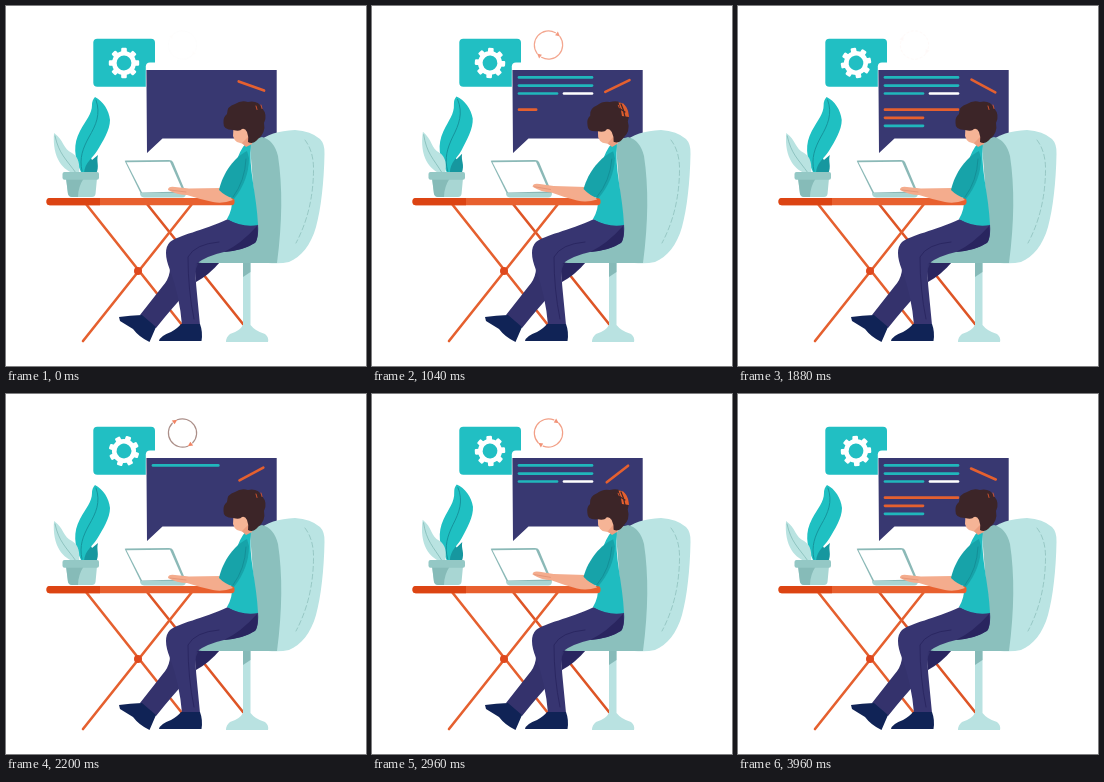
These frames come from a looping animation (360 by 360 pixels, 4000 ms). An HTML page:

```html
<!DOCTYPE html>
<html lang="en">
<head>
<meta charset="utf-8">
<title>Working at a desk</title>
<style>
html, body { margin: 0; width: 100%; height: 100%; overflow: hidden; background: #fff; }
svg { display: block; width: 100vw; height: 100vh; }
.line { fill: none; stroke-linecap: round; stroke-linejoin: round; }
</style>
</head>
<body>
<svg viewBox="0 0 360 360">
  <rect x="87.3" y="32.800" width="61.7" height="48" rx="4" fill="#21bfc3"/>
  <g id="gear" fill="#fff"></g>
  <path d="M139.800 82V60.500Q140 56.500 144 56.500H150V82Z" fill="#fff"/>

  <path d="M140.400 64H270.700V132.600H156.500L141 147Z" fill="#383871"/>
  <g id="code" class="line" stroke-width="2.700"></g>
  <path id="slash" class="line" d="M-13.500 0H13.500" stroke="#e5602f" stroke-width="2.600"/>

  <g id="sync" class="line" stroke-width="1.2">
    <path d="M-3.500-13.700A14.200 14.200 0 0 0-2.500 14M3.500 13.700A14.200 14.200 0 0 0 2.500-14"/>
    <path d="M-2.500-16.200L2.500-14L-2-11.600ZM2.500 16.200L-2.500 14L2 11.600Z" fill="#ee704b" stroke="none"/>
  </g>

  <!-- table legs -->
  <g class="line" stroke="#e5602f" stroke-width="2.600">
    <path d="M141 198L237 318" stroke="#de5526"/>
    <path d="M80 198L176 319M186 198L77 335"/>
  </g>
  <circle cx="132" cy="265" r="4" fill="#df481d"/>

  <!-- plant -->
  <path id="leafLow" d="M75 168C76 160 80 155 84 150L86 154L92 149C90 156 94 160 90 168Z" fill="#16979f"/>
  <g id="leafBig">
    <path d="M75 166C68 151 67 138 74 125C80 114 86 108 86 99Q86 94 89 91C97 95 103 104 104 114C104 124 97 135 91 145C86 153 79 156 78 167Z" fill="#1fc0c2"/>
    <path d="M76 165C73 152 77 142 83 131C90 119 95 108 90 94" class="line" stroke="#168f98" stroke-width=".9"/>
  </g>
  <g id="leafPale">
    <path d="M70 168C57 165 46 152 48 127C58 134 57 143 66 147C73 151 74 159 73 168Z" fill="#b9e3e1"/>
    <path d="M49 130C53 148 60 153 70 167" class="line" stroke="#83bbb8" stroke-width=".8"/>
  </g>
  <path d="M60 172H91L89.500 188Q89 191 86 191H66Q63 191 62 188Z" fill="#a8d6d3"/>
  <path d="M60 172H78Q72 181 72 191H66Q63 191 62 188Z" fill="#86bbb8"/>
  <rect x="56.500" y="166" width="36.500" height="7.800" rx="2" fill="#94c8c5"/>

  <!-- chair -->
  <path d="M237 255H244.500V319Q249 325 259 328Q263 331 262 336H220Q220 331 224 328Q234 325 237 319Z" fill="#b9e2e1"/>
  <path d="M237 256H244.500V266L237 271Z" fill="#86bab8"/>
  <path d="M188 256H214Q203 269 190 276Z" fill="#292660"/>
  <path d="M252 136Q264 125 289 124Q305 125 314 133Q319 138 318.500 148C318 176 315 203 310 221C305 239 295 251 283 256Q275 258 262 257Z" fill="#bae4e3"/>
  <path d="M299 134Q308 146 307.500 165Q307 205 290 237" class="line" stroke="#8fc0bd" stroke-width=".8" stroke-dasharray="5 3"/>
  <path d="M244 140Q247 133 256 131Q268 134 272 150Q279 196 271 257H196Q190 257 192 253L232 241Q249 235 250 215Z" fill="#8bc0bd"/>

  <!-- legs -->
  <path d="M161 247Q169 267 156 281L134 309L150 322Q166 302 180 287L192 258Z" fill="#34326c"/>
  <path d="M222 213Q237 221 252 218Q253 229 250 236Q240 244 218 246Q200 250 190 258Q189 270 191 288L194 319H176Q174 292 164 264Q156 244 164 236C173 229 196 225 222 213Z" fill="#373571"/>
  <path d="M251 220Q253 231 249 237Q235 245 218 246Q235 238 251 220Z" fill="#29255f"/>
  <path d="M213 236Q189 238 182 251Q182 284 188 313" class="line" stroke="#28245e" stroke-width=".8"/>
  <path d="M113 311Q124 309.500 136 309L150 321L143.500 336Q133 331 127 323L114 315Z" fill="#102356"/>
  <path d="M153 335Q154 330 165 326Q172 322 175 318H194Q197 326 195.500 335Z" fill="#102356"/>

  <!-- torso and head -->
  <path d="M237 141Q241 136 245 137C242 162 251 190 252 219Q237 222 221 213Q227 203 226 191Q226 158 237 141Z" fill="#1fbcc0"/>
  <g id="head">
    <path d="M227.500 121H242L245 135L240 140Q236 137 231 136Q228 134 227 130Z" fill="#f5b496"/>
    <path d="M236 137L245 128L246 138L240 141Z" fill="#ec9e80"/>
    <path d="M221 108Q221 100 229 98Q235 94 242 96Q252 94 256 102Q262 109 258 117Q260 127 252 133Q247 139 242 136Q243 131 241 126Q239 122 236 123Q234 126 227 124Q217 124 217.500 117Q217 111 221 108Z" fill="#3c2528"/>
    <path d="M250 100L251 103.500M255 99L256 102.500" class="line" stroke="#d9552f" stroke-width=".9"/>
  </g>
  <g id="shine">
    <path d="M246.500 96.500Q256 97 257 111L250 110Q249 102 246.500 96.500Z" fill="#e5602f"/>
    <path d="M242 101Q248 102 253 106M249 98Q252 104 253 111" class="line" stroke="#3c2528" stroke-width="1.200"/>
  </g>

  <!-- table and laptop -->
  <rect x="40.500" y="192" width="188" height="7.200" rx="3" fill="#e8602f"/>
  <path d="M94 192H44Q40.500 192 40.500 195.600T44 199.200H94Z" fill="#dc4413"/>
  <path d="M119 155.500Q118 154.500 120 154.500L163 154Q166 154 167 156L180 187L135 188Z" fill="#8bb9b7"/>
  <path d="M120.500 156.200L164 155.700L177 185.500L136 186.500Z" fill="#fff"/>
  <path d="M134 187H180Q180 191.500 176 191.500H138Q134 191 134 187Z" fill="#a9d4d1"/>

  <!-- arm -->
  <g id="arm">
    <path d="M162 184Q162 180 169 181L183 182.500L215 182L227 194Q217 198 207 196Q193 193 181 189Q171 189 162 184Z" fill="#f4ac8d"/>
    <path d="M164 184L180 186" class="line" stroke="#df8e71" stroke-width=".7"/>
    <path d="M241 145C229 151 217 166 213 184Q219 190 228 193Q243 174 243 152Z" fill="#17a3a9"/>
    <path d="M240 153Q239 175 227 191" class="line" stroke="#138b94" stroke-width=".8"/>
  </g>
</svg>
<script>
const $ = id => document.getElementById(id);
const NS = 'http://www.w3.org/2000/svg';
const PERIOD = 2000;
const clamp = x => Math.max(0, Math.min(1, x));
const ease = x => { x = clamp(x); return x * x * (3 - 2 * x); };
const ramp = (t, a, b) => ease((t - a) / (b - a));

function add(parent, name, attrs) {
  const el = document.createElementNS(NS, name);
  for (const key in attrs) el.setAttribute(key, attrs[key]);
  return parent.appendChild(el);
}

function track(keys, t) {
  const i = Math.max(1, keys.findIndex(k => k[0] >= t));
  const [a, from] = keys[i - 1], [b, to] = keys[i];
  return from + (to - from) * clamp((t - a) / (b - a));
}

function turn(id, angle, x, y) {
  $(id).setAttribute('transform', `rotate(${angle} ${x} ${y})`);
}

// Gear: a ring with eight teeth
add($('gear'), 'circle', { cx: 118, cy: 57, r: 9.7, fill: 'none', stroke: '#fff', 'stroke-width': 4.6 });
for (let i = 0; i < 8; i++) {
  add($('gear'), 'rect', {
    x: 115.2, y: 41.8, width: 5.6, height: 6, rx: 1.2,
    transform: `rotate(${i * 45} 118 57)`
  });
}

// x, y, length, colour, start, end
const lines = [
  [147, 71.4, 73, '#20b7bc', 40, 220],
  [147, 79.6, 73, '#20b7bc', 270, 540],
  [147, 87.5, 38, '#20b7bc', 610, 760],
  [192, 87.5, 28, '#fff', 780, 930],
  [147, 103.7, 73, '#e5602f', 980, 1240],
  [147, 111.8, 38, '#e5602f', 1270, 1440],
  [147, 119.8, 38, '#20b7bc', 1540, 1800]
].map(([x, y, len, stroke, start, end]) =>
  ({ x, y, len, start, end, el: add($('code'), 'path', { stroke }) }));

const slashKeys = [[0, 20], [200, -28], [400, -39], [600, -45], [780, -44],
  [960, -38], [1220, 0], [1480, 35], [1700, 38], [1960, 24], [2000, 20]];
const syncKeys = [[0, 0], [140, .85], [600, .9], [960, .75], [1480, .4], [1800, .1], [1920, 0], [2000, 0]];

function draw(time) {
  const t = time % PERIOD;
  const spin = 180 * t / PERIOD;

  for (const { x, y, len, start, end, el } of lines) {
    const p = clamp((t - start) / (end - start));
    el.setAttribute('d', p > 0 ? `M${x} ${y}h${len * p}` : '');
  }

  $('slash').setAttribute('transform', `translate(245.4 80) rotate(${track(slashKeys, t)})`);
  turn('gear', spin, 118, 57);

  // The sync ring breaks into dots as it fades
  const sync = $('sync');
  sync.setAttribute('transform', `translate(176.5 39) rotate(${spin - 50})`);
  sync.setAttribute('opacity', track(syncKeys, t));
  sync.setAttribute('stroke', t < 350 ? '#9d7c75' : '#ee805f');
  sync.setAttribute('stroke-dasharray', t > 1300 ? '2 2.5' : 'none');

  const sway = ramp(t, 500, 1050) - ramp(t, 1420, 1980);
  turn('leafBig', -3.3 * sway, 78, 170);
  turn('leafLow', -5 * sway, 78, 170);
  turn('leafPale', 3.8 * sway, 70, 170);

  const nod = ramp(t, 220, 580) - ramp(t, 980, 1420);
  turn('head', -5.5 * nod, 240, 140);
  $('shine').setAttribute('opacity', nod);
  turn('arm', 2.6 * nod, 238, 150);
}

function tick(now) {
  draw(now);
  requestAnimationFrame(tick);
}
draw(0);
requestAnimationFrame(tick);
</script>
</body>
</html>
```
